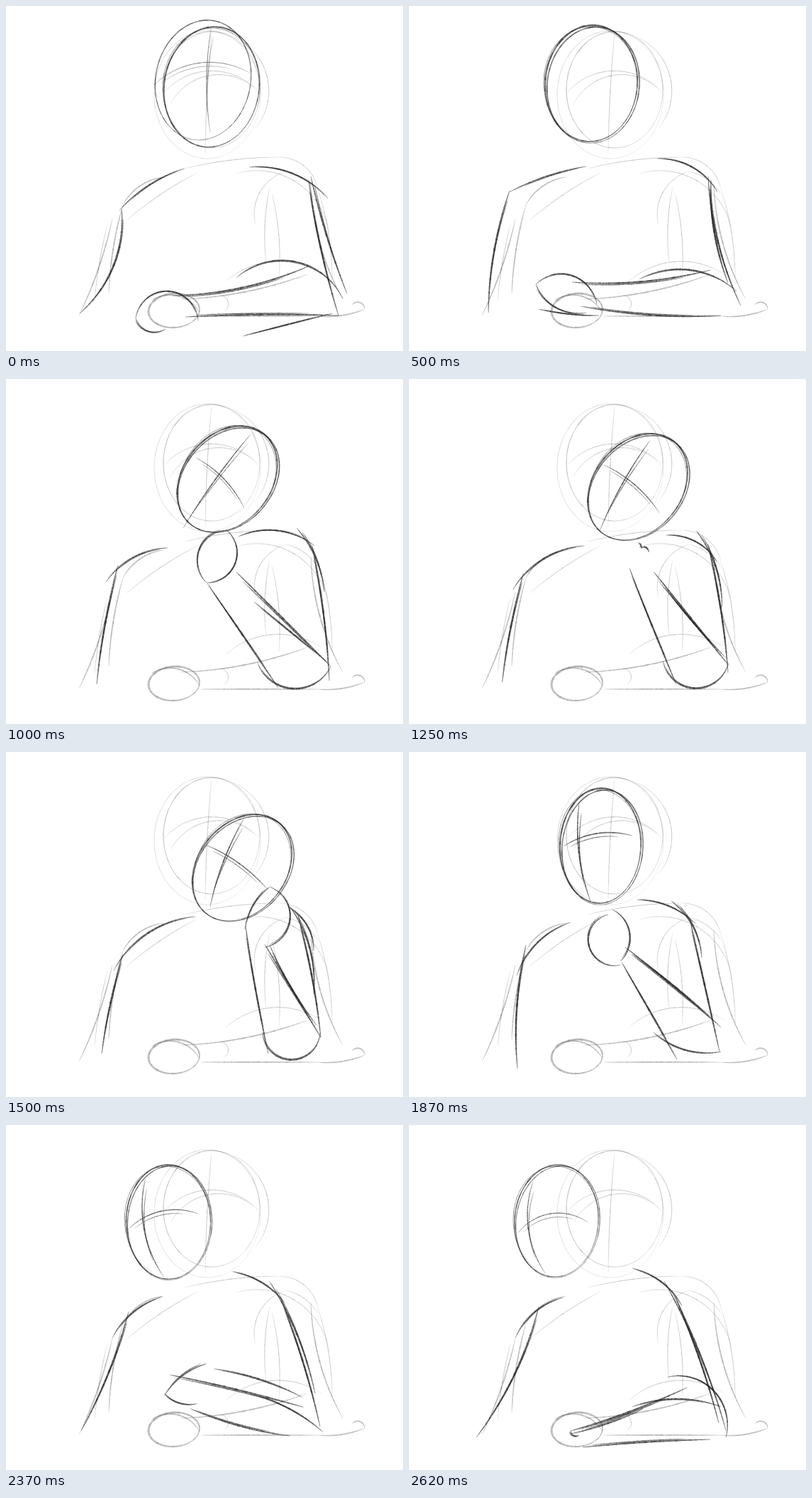
Write an HTML page with a canvas that moves like this. It is 560 px wide and 486 px high and loops after 2750 ms.

```html
<!DOCTYPE html>
<html lang="en">
<head>
<meta charset="utf-8">
<title>Pencil pose sketch</title>
<style>
html, body { margin: 0; width: 100%; height: 100%; overflow: hidden; background: #fff; }
canvas { display: block; }
</style>
</head>
<body>
<canvas id="stage" width="560" height="486"></canvas>
<script>
const ctx = document.getElementById('stage').getContext('2d');
const LOOP = 2750, STEP = 125, FRAMES = 22;
const mix = (a, b, u) => a + (b - a) * u;
const random = seed => () => (seed = seed * 16807 % 2147483647) / 2147483647;

// Circular arc from one end to the other; bow is its height in % of the chord
function arc([x0, y0, x1, y1, bow]) {
  const half = 2 * Math.atan((bow || .1) / 50), k = 2 * Math.sin(half);
  const dx = x1 - x0, dy = y1 - y0;
  return t => {
    const a = half * (2 * t - 1);
    const along = .5 + Math.sin(a) / k, up = (Math.cos(a) - Math.cos(half)) / k;
    return [x0 + dx * along + dy * up, y0 + dy * along - dx * up];
  };
}

// Ellipse tilted clockwise, drawn anticlockwise from the start angle
function ring([cx, cy, rx, ry, tilt], start = 45) {
  const r = tilt * Math.PI / 180, c = Math.cos(r), s = Math.sin(r);
  return t => {
    const a = (start - 370 * t) * Math.PI / 180;
    const x = rx * Math.cos(a), y = ry * Math.sin(a);
    return [cx + x * c - y * s, cy + x * s + y * c];
  };
}

// Tapered line with a little graphite grain, over part of a curve
function pencil(curve, width, dark, from = 0, to = 1) {
  const n = 100, rnd = random(7);
  let p = curve(from);
  for (let i = 1; i <= n; i++) {
    const q = curve(mix(from, to, i / n));
    const press = .3 + .7 * Math.sin(Math.PI * (i - .5) / n) ** .6;
    ctx.globalAlpha = dark * (.7 + .3 * rnd()) * (.6 + .4 * press);
    ctx.lineWidth = width * press * (.85 + .3 * rnd());
    ctx.beginPath();
    ctx.moveTo(...p);
    ctx.lineTo(...q);
    ctx.stroke();
    p = q;
  }
}

const faint = [
  [170,302, 270,235, 3], [252,229, 385,213, 3], [385,213, 440,258, 18],
  [325,236, 455,315, 22], [125,415, 143,308, 2], [352,308, 395,233, 20],
  [395,233, 440,265, 10], [367,362, 372,255, 4], [375,263, 385,385, 4],
  [310,388, 445,378, 17], [290,38, 281,208, -1], [222,123, 357,122, 23],
  [232,138, 350,115, 24], [300,408, 308,430, 40], [320,43, 352,172, 25],
  [440,258, 460,385, 4]
];
const soft = [
  [103,436, 150,300, -3], [145,405, 165,280, 3], [165,280, 222,241, 12],
  [430,250, 475,413, -6], [247,413, 425,378, -4], [275,437, 440,437, 0],
  [440,437, 506,427, -6], [506,427, 488,421, -35], [273,432, 205,415, -22]
];

// Construction drawing that stays underneath
function drawUnder() {
  for (const a of faint) pencil(arc(a), .9, .34);
  for (const a of soft) pencil(arc(a), 1.8, .36);
  pencil(ring([290, 118, 68, 82, 0]), 1, .36);
  pencil(ring([284, 125, 75, 90, 0]), .7, .26);
  pencil(ring([237, 429, 36, 24, -4]), 2.8, .38);
}

// head: centre, radii, tilt, spread of the rings, line width
// face: line weight, then the upright and the level guide
// body: left shoulder, left arm, right shoulder, two right arm lines,
//       two upper forearm lines, lower forearm, two hand lines, elbow
const widths = [1.9, 2.4, 2.1, 2.2, 2.4, 2.4, 2, 2.3, 2.1, 2.1, 2.1];
const poses = [];
const pose = (at, head, face, ...body) => poses.push({ at, parts: [head, face, ...body] });

pose(0, [290,114, 67,85,8, -12, 2],
  [.9, 290,28, 288,178, -4, 208,112, 345,95, 17],
  [252,229, 160,288, -7], [163,286, 104,433, 12], [343,227, 454,271, 12],
  [430,240, 481,405, -2], [427,245, 469,436, -2], [235,408, 428,366, -5],
  [325,383, 475,412, 25], [253,438, 470,436, 1], [271,443, 183,440, -45],
  [183,440, 225,455, -25], [334,465, 460,433, 0]);

pose(4, [257,109, 65,82,4, 3, 2.4],
  [0, 262,28, 262,186, -4, 200,112, 322,95, 12],
  [250,226, 142,262, -4], [142,260, 112,432, -4], [350,215, 435,262, 14],
  [422,240, 468,422, -5], [426,245, 450,390, -5], [230,389, 425,372, -4],
  [325,385, 462,402, 16], [243,423, 440,436, -3], [265,420, 179,392, -30],
  [179,392, 250,432, -18], [183,427, 268,436, -3]);

pose(8, [312,141, 62,82,39, 2, 2.3],
  [1.5, 345,78, 250,210, -2, 268,111, 336,182, 8],
  [228,238, 141,286, -12], [158,262, 128,430, -2], [328,222, 435,235, 14],
  [410,210, 449,300, 8], [432,235, 456,425, 2], [325,272, 458,405, 0],
  [350,314, 455,400, 0], [284,288, 384,435, 0], [311,213, 283,287, -33],
  [283,287, 310,212, -36], [355,400, 458,405, -33]);

pose(12, [333,163, 62,82,38, 2, 2],
  [1.7, 335,95, 288,218, -4, 282,131, 370,195, 6],
  [267,232, 152,308, -13], [165,285, 135,425, -2], [398,218, 434,280, 14],
  [400,217, 434,342, 9], [412,230, 444,402, 2], [365,271, 444,402, 0],
  [372,272, 438,385, -3], [338,245, 370,425, -1], [365,275, 372,190, -38],
  [372,190, 337,250, -10], [362,395, 443,395, -48]);

pose(15, [270,132, 57,81,2, 3, 2.2],
  [1.9, 240,72, 256,210, -6, 218,133, 315,118, 11],
  [228,240, 152,315, -12], [165,272, 153,446, -4], [322,208, 404,242, 10],
  [370,210, 413,290, 11], [396,235, 438,422, 0], [305,275, 428,378, 1],
  [315,285, 440,388, 2], [300,296, 378,433, 0], [281,229, 298,300, -50],
  [298,295, 287,222, -26], [345,395, 440,422, -12]);

pose(17, [250,138, 60,82,-5, 2, 2],
  [1.8, 218,72, 252,218, -9, 193,140, 290,113, 9],
  [223,241, 150,300, -9], [163,270, 118,420, 1], [324,211, 400,245, 8],
  [383,220, 425,327, 6], [399,245, 449,430, 2], [235,273, 447,425, 4],
  [272,290, 395,370, 0], [275,345, 375,433, -8], [235,273, 219,327, -22],
  [219,325, 299,348, 2], [330,405, 447,425, -16]);

pose(21, [208,135, 59,79,4, 2, 1.5],
  [1.3, 175,80, 193,210, -12, 154,152, 252,137, 20],
  [218,243, 150,300, -12], [183,256, 95,440, 5], [315,202, 385,255, 11],
  [360,220, 447,430, 3], [375,240, 437,420, 2], [228,431, 392,370, -2],
  [315,397, 440,397, 9], [245,454, 425,443, 1], [330,400, 228,435, 3],
  [228,431, 240,437, -30], [365,355, 447,440, 28]);

function drawHead([cx, cy, rx, ry, tilt, spread, w]) {
  pencil(ring([cx, cy, rx, ry, tilt]), w, .85);
  pencil(ring([cx + spread, cy + spread * .8, rx, ry, tilt + 3], 80), w * .7, .8);
  pencil(ring([cx, cy, rx + 2, ry - 2, tilt - 6], 20), .9, .65, 0, .7);
}

// A guide or limb line, then a shorter and lighter second go beside it
function drawTwice(line, w, shift) {
  const [x, y] = shift, [x0, y0, x1, y1, bow] = line;
  pencil(arc(line), w, .9);
  pencil(arc([x0 + x, y0 + y, x1 - x / 2, y1 + y, bow]), w * .7, .8, .08, .8);
}

function draw(frame) {
  ctx.globalAlpha = 1;
  ctx.fillStyle = '#fff';
  ctx.fillRect(0, 0, 560, 486);
  ctx.strokeStyle = '#222';
  drawUnder();

  const next = Math.max(1, poses.findIndex(p => p.at >= frame));
  const a = poses[next - 1], b = poses[next];
  const u = (frame - a.at) / (b.at - a.at);
  const [head, face, ...body] = a.parts.map((part, i) =>
    part.map((v, k) => mix(v, b.parts[i][k], u)));

  drawHead(head);
  if (face[0] > .1) {
    drawTwice(face.slice(1, 6), face[0], [5, 3]);
    drawTwice(face.slice(6), face[0] * .85, [2, 5]);
  }
  const rnd = random(21);
  body.forEach((line, i) =>
    drawTwice(line, widths[i], [rnd() * 5 - 2.5, rnd() * 5 - 2.5]));
}

let shown = -1;
const start = performance.now();
function tick() {
  const t = (performance.now() - start) % LOOP;
  const frame = Math.min(FRAMES - 1, Math.floor((t + 5) / STEP));
  if (frame !== shown) draw(shown = frame);
  requestAnimationFrame(tick);
}
tick();
</script>
</body>
</html>
```
